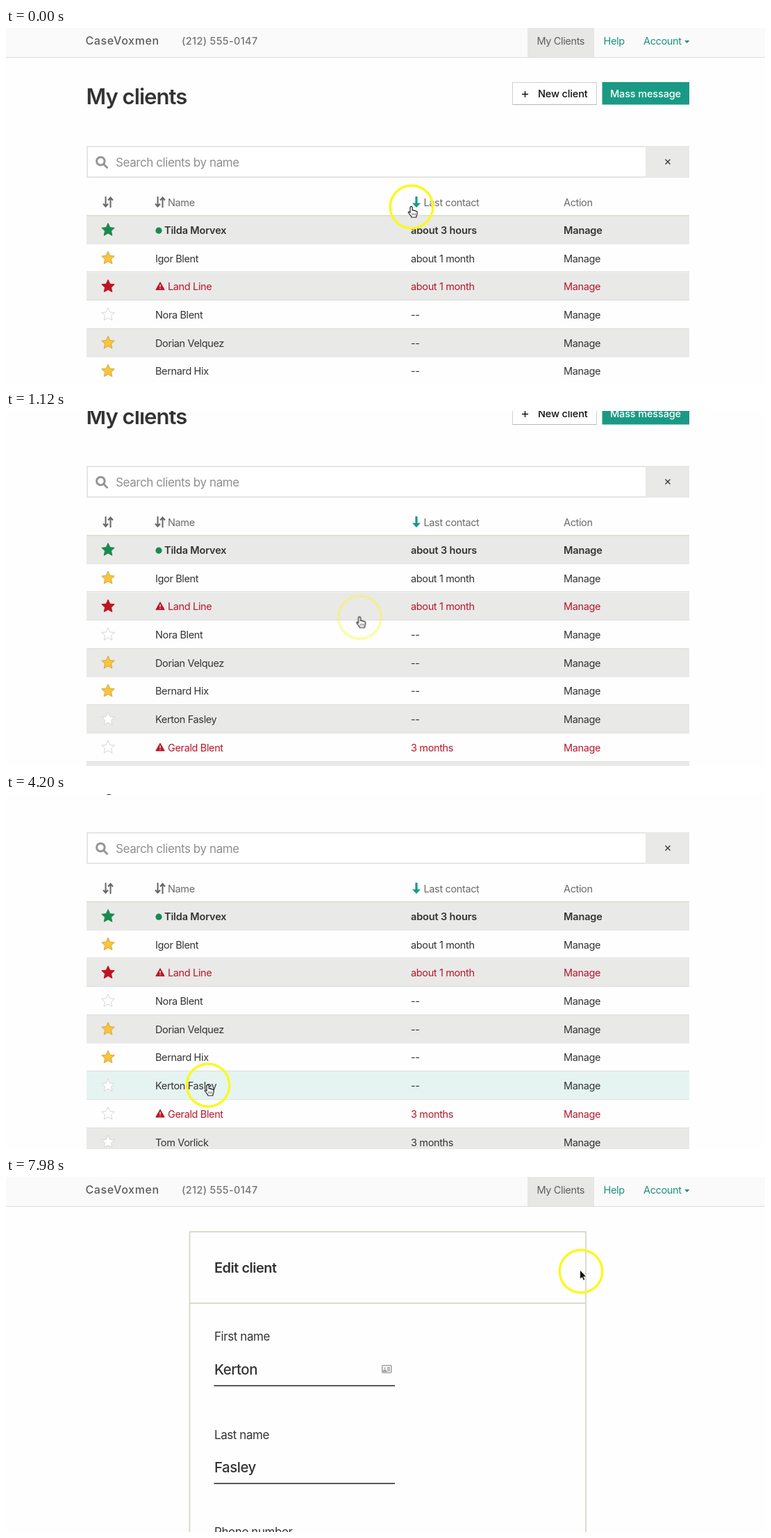
Animation, 1093 px wide and 512 px high, one loop 8000 ms. Source, as an HTML page:

```html
<!DOCTYPE html>
<html lang="en">
<head>
<meta charset="utf-8">
<title>Client list</title>
<style>
html, body { margin: 0; width: 100%; height: 100%; overflow: hidden; background: #fefefe; }
svg { display: block; }

/* y of a text is the middle of its capitals */
text { font: 400 14.5px Inter, sans-serif; letter-spacing: -.025em; fill: #333; transform: translateY(.3635em); white-space: pre; }
.med { font-weight: 500; letter-spacing: -.01em; fill: #111; }
.bold { font-weight: 600; letter-spacing: -.01em; }
.grey { fill: #6a6a6a; }
.teal { fill: #1c917b; }
.red { fill: #b5182a; }
.white { fill: #fff; }
.h1 { font-size: 31px; font-weight: 600; letter-spacing: -.03em; }
.h2 { font-size: 20.5px; font-weight: 600; }
.value { font-size: 20.5px; font-weight: 500; }
.label { font-size: 17px; }
.hint { font-size: 17px; fill: #8f8f8f; }
.brand { font-size: 16px; font-weight: 500; letter-spacing: .04em; fill: #5c5c5c; }
.tel { font-weight: 500; letter-spacing: .025em; fill: #747474; }
.mid { text-anchor: middle; fill: #6a6a6a; }
.btn { fill: #fff; stroke: #cfcfcf; }
.line { fill: none; stroke: #dcdcdc; }
.card { fill: none; stroke: #dcdacd; stroke-width: 2; }
.field { stroke: #585858; stroke-width: 2; }

/* Every step lasts 140 ms, which is 1.75% of the loop */
.anim { animation: 8s step-end -4ms infinite; }
#list { animation-name: list; }
#chat { animation-name: chat; }
#edit { animation-name: edit; }
.scroll { animation-name: scroll; }
#tab { animation-name: tab; }
#tabText { animation-name: tabText; }
#hover { animation-name: hover; }
#pressed { animation-name: pressed; }
#box { animation-name: box; }
#cursor { animation-name: move; }
#ring { animation-name: ring; }
#dot { animation-name: dot; }
#hand { animation-name: hand; }
#arrow { animation-name: arrow; }

@keyframes list { 0% { opacity: 1 } 54.25%, 100% { opacity: 0 } }
@keyframes chat { 0% { opacity: 0 } 54.25% { opacity: 1 } 92.75%, 100% { opacity: 0 } }
@keyframes edit { 0% { opacity: 0 } 92.75%, 100% { opacity: 1 } }
@keyframes tab { 0% { opacity: 1 } 54.25% { opacity: 0 } 92.75%, 100% { opacity: 1 } }
@keyframes tabText { 0% { fill: #5f5f5f } 54.25% { fill: #1c917b } 92.75%, 100% { fill: #5f5f5f } }
@keyframes hover { 0% { opacity: 0 } 40.25%, 100% { opacity: 1 } }
@keyframes pressed { 0% { opacity: 0 } 82.25%, 100% { opacity: 1 } }
@keyframes box { 0% { stroke: #1a9a84 } 82.25%, 100% { stroke: #949494 } }
@keyframes scroll {
  0% { transform: translateY(0) }
  5.25% { transform: translateY(0); animation-timing-function: steps(4) }
  12.25% { transform: translateY(-76px); animation-timing-function: steps(2) }
  15.75% { transform: translateY(-106px) }
  17.5% { transform: translateY(-115px) }
  54.25%, 100% { transform: translateY(0) }
}
@keyframes move {
  0% { transform: translate(584px, 258px); animation-timing-function: steps(4) }
  7% { transform: translate(509.5px, 297.5px) }
  14% { transform: translate(509.5px, 297.5px); animation-timing-function: steps(6) }
  24.5% { transform: translate(291px, 420px) }
  57.75% { transform: translate(317px, 398px) }
  63% { transform: translate(415.5px, 311.5px); animation-timing-function: steps(2) }
  66.5% { transform: translate(600px, 215px) }
  68.25% { transform: translate(600px, 215px); animation-timing-function: steps(6) }
  78.75% { transform: translate(933.5px, 77.5px) }
  94.5% { transform: translate(933.5px, 77.5px); animation-timing-function: steps(3) }
  99.75%, 100% { transform: translate(828px, 136px) }
}
@keyframes ring {
  0% { opacity: 1; transform: scale(1) }
  7% { opacity: 1; transform: scale(1); animation-timing-function: steps(3) }
  12.25% { opacity: .4; transform: scale(1) }
  14% { opacity: .4; transform: scale(1); animation-timing-function: steps(2) }
  17.5% { opacity: 1; transform: scale(1) }
  40.25% { opacity: 0; transform: scale(.3) }
  45.5% { opacity: .3; transform: scale(.3); animation-timing-function: steps(3) }
  50.75% { opacity: 1; transform: scale(1) }
  82.25% { opacity: 0; transform: scale(.3) }
  87.5% { opacity: .3; transform: scale(.3); animation-timing-function: steps(3) }
  92.75%, 100% { opacity: 1; transform: scale(1) }
}
@keyframes dot {
  0% { opacity: 0; stroke: #3445ae }
  40.25% { opacity: 1; stroke: #3445ae }
  45.5% { opacity: 0; stroke: #3445ae }
  82.25% { opacity: 1; stroke: #3a3a7c }
  87.5%, 100% { opacity: 0; stroke: #3a3a7c }
}
@keyframes hand { 0% { opacity: 1 } 57.75% { opacity: 0 } 78.75% { opacity: 1 } 96.25%, 100% { opacity: 0 } }
@keyframes arrow { 0% { opacity: 0 } 57.75% { opacity: 1 } 78.75% { opacity: 0 } 96.25%, 100% { opacity: 1 } }
</style>
</head>
<body>
<svg width="1093" height="512" viewBox="0 0 1093 512">
  <defs>
    <path id="star" d="M0-9.7 2.8-3.6 9.2-3 4.5 1.5 5.8 8 0 4.7-5.8 8-4.5 1.5-9.2-3-2.8-3.6z" stroke-linejoin="round"/>
    <path id="down" d="M-1.6-8h3.2V1.5H6L0 8-6 1.5h4.4z"/>
    <g id="sort" fill="none" stroke="#666" stroke-width="2">
      <path d="M-3.5-8V6M-7 2.5l3.5 4 3.5-4M3.5 8V-6M0-2.5l3.5-4 3.5 4"/>
    </g>
    <g id="warn">
      <path d="M0-5.5 6.2 5.5H-6.2z" fill="#b5182a" stroke="#b5182a" stroke-linejoin="round"/>
      <path d="M0-2V1.6M0 2.8V4.2" stroke="#f3e3e4" stroke-width="1.4"/>
    </g>
  </defs>

  <g id="list" class="anim">
    <g class="anim scroll">
      <text class="h1" x="115.5" y="99">My clients</text>
      <rect class="btn" x="729.5" y="78.5" width="121" height="32"/>
      <path d="M730 110.5h120" stroke="#b9b9b9"/>
      <path d="M743 95.5h9M747.5 91v9" stroke="#111" stroke-width="1.4"/>
      <text class="med" x="766" y="94.5">New client</text>
      <rect x="858.5" y="78" width="125.5" height="32.5" fill="#1a9a84"/>
      <text class="med white" x="870" y="94.5">Mass message</text>

      <rect x="117" y="171" width="866" height="44" fill="#fff" stroke="#e6e6e4" stroke-width="2"/>
      <rect x="921" y="170" width="63" height="46" fill="#e9e9e8"/>
      <g fill="none" stroke="#969696" stroke-width="3">
        <circle cx="136.3" cy="192" r="5.8"/>
        <path d="M140.5 196.2l5 5" stroke-linecap="round"/>
      </g>
      <text class="hint" x="158" y="194">Search clients by name</text>
      <path d="M949.5 189.5l7 7m0-7l-7 7" stroke="#333" stroke-width="1.4"/>

      <use href="#sort" x="147" y="251"/>
      <use href="#sort" x="222" y="251"/>
      <text class="grey" x="233" y="252">Name</text>
      <use href="#down" x="591" y="251" fill="#1a9a84"/>
      <text class="grey" x="601.5" y="252">Last contact</text>
      <text class="grey" x="803" y="252">Action</text>
      <g id="rows"></g>
      <path d="M116 270.5h868" stroke="#dbdacb" stroke-width="1.6"/>
    </g>
  </g>

  <g id="chat" class="anim">
    <path class="line" d="M0 119.5h1093M0 494.5h1093"/>
    <rect class="btn" x="115.5" y="60.5" width="84" height="33"/>
    <rect class="btn" x="859.5" y="60.5" width="120" height="33"/>
    <path d="M115 93.5h85M859 93.5h121" stroke="#b9b9b9"/>
    <path d="M139 78.5h-9.5m4.2-4.4-4.4 4.4 4.4 4.4" fill="none" stroke="#111" stroke-width="1.5"/>
    <text class="med" x="148" y="78">Home</text>
    <text class="h2" x="213.5" y="72.5">Kerton Fasley</text>
    <text x="214" y="100" style="letter-spacing:-.005em">(800) 555-0163</text>
    <rect id="pressed" class="anim" x="860" y="61" width="119" height="32" fill="#dbdad1" stroke="#74c7b7" stroke-width="2"/>
    <text class="med" x="871" y="78">Manage client</text>

    <path d="M523 218l10 4q10-1 17 2 8-4 16-2l12-4v26l-7 3q-3 7-10 8-4 7-10 8-5 1-8-3-7 0-9-5-5 0-6-5l-5-6z" fill="#fbc751"/>
    <path d="M578 240v4l-7 3q-3 7-10 8-4 7-10 8l-3-1q8-3 10-9 8-2 11-9z" fill="#d9a136"/>
    <path d="M567 222q-13 0-18 5l-9 8q4 5 10 0l6-3q7 4 15 12M528 250q1-5 6-6 2 4-1 10M534 255q1-6 6-7 4 4 3 12M543 260q0-6 5-7 4 4 2 9" fill="none" stroke="#cb922b" stroke-width="1.3" stroke-linecap="round"/>

    <text class="mid" x="550" y="289">You haven’t sent Kerton any messages</text>
    <text class="mid" x="550" y="311">yet. Start by introducing yourself.</text>
    <rect id="box" class="anim" x="116.5" y="506" width="570.5" height="60" fill="#fff" stroke-width="2"/>
    <rect x="708" y="505" width="86.5" height="33" fill="#1a9a84"/>
    <rect class="btn" x="799.5" y="505.5" width="120" height="33"/>
  </g>

  <g id="edit" class="anim">
    <path class="card" d="M264.5 520V79h570.5v441M264.5 182h570.5"/>
    <text class="h2" x="300" y="131" style="font-size:20px">Edit client</text>
    <text class="label" x="300" y="230">First name</text>
    <text class="value" x="300" y="277.5">Kerton</text>
    <g fill="none" stroke="#a2a2a2" stroke-width="1.6">
      <rect x="541.8" y="271.8" width="13" height="10.4" rx="1.2"/>
      <path d="M549 274.7h4M549 277h4M549 279.3h4"/>
      <path d="M543.5 280q2-3 4 0zM545.5 274.4v2.4" stroke-width="2"/>
    </g>
    <path class="field" d="M299.5 301H560M299.5 442H560"/>
    <text class="label" x="300" y="371.5">Last name</text>
    <text class="value" x="300" y="418.5">Fasley</text>
    <text class="label" x="300" y="512">Phone number</text>
  </g>

  <g class="anim scroll">
    <rect width="1093" height="42" fill="#fafafa"/>
    <path d="M0 42.5h1093" stroke="#dcdcd6"/>
    <rect id="tab" class="anim" x="751" width="96" height="42" fill="#e7e7e6"/>
    <text class="brand" x="114.5" y="18.5">CaseVoxmen</text>
    <text class="tel" x="253" y="18.5">(212) 555-0147</text>
    <text id="tabText" class="anim" x="764.5" y="18.5">My Clients</text>
    <text class="teal" x="860.5" y="18.5">Help</text>
    <text class="teal" x="918" y="18.5">Account</text>
    <path class="teal" d="M977 18h7.4l-3.7 4z"/>
  </g>

  <g id="cursor" class="anim">
    <circle id="ring" class="anim" r="30.8" fill="none" stroke="#fbf81f" stroke-width="3.4"/>
    <circle id="dot" class="anim" r="9" fill="none" stroke-width="3"/>
    <g id="hand" class="anim">
      <path d="M-2 1a1.6 1.6 0 0 1 3.2 0v4l1-.3 1.2.3.8.6 1.2-.2.8.8 1.3.2.6 1v3l-1.2 3V15h-7l-.4-1.4-2.8-3.6-1.5-2 .6-1 1.2.2 1 1.2z" fill="#fff" stroke="#222" stroke-width="1.2" stroke-linejoin="round"/>
      <path d="M1 9.2v3M3.2 9.2v3M5.4 9.2v3" stroke="#333" stroke-width=".8"/>
    </g>
    <path id="arrow" class="anim" d="M-1.5-2V11.5l3-2.8 2 4.6 2.3-1-2-4.4h4.2z" fill="#111" stroke="#fff" stroke-width=".9"/>
  </g>
</svg>
<script>
const stars = {
  green: ['#188a4d', '#188a4d'],
  gold: ['#f7c43a', '#d8a545'],
  red: ['#bd1522', '#bd1522'],
  none: ['#fff', '#d5d5d5']
};
const clients = [
  ['green', 'Tilda Morvex', 'about 3 hours', 'bold'],
  ['gold', 'Igor Blent', 'about 1 month'],
  ['red', 'Land Line', 'about 1 month', 'red'],
  ['none', 'Nora Blent', '--'],
  ['gold', 'Dorian Velquez', '--'],
  ['gold', 'Bernard Hix', '--'],
  ['none', 'Kerton Fasley', '--'],
  ['none', 'Gerald Blent', '3 months', 'red'],
  ['none', 'Tom Vorlick', '3 months']
];
const rowHeight = 40.7, clicked = 6;
const nameX = { bold: 228, red: 233 };
const badge = {
  bold: y => `<circle cx="220" cy="${y + .5}" r="4.6" fill="#188a4d"/>`,
  red: y => `<use href="#warn" x="222" y="${y - 1}"/>`
};

function row([star, name, contact, kind = ''], i) {
  const top = 271 + i * rowHeight, y = top + 20.7;
  const band = attrs => `<rect x="116" y="${top}" width="868" height="${rowHeight}" ${attrs}/>`;
  const cell = (x, text) => `<text class="${kind}" x="${x}" y="${y}">${text}</text>`;
  const [fill, stroke] = stars[star];
  const edge = Math.round(top + rowHeight) - .5;
  return band(`fill="${i % 2 ? '#fefefe' : '#e9e9e8'}"`)
    + (i === clicked ? band('id="hover" class="anim" fill="#e6f4f1"') : '')
    + `<path class="line" d="M116 ${edge}h868"/>`
    + `<use href="#star" x="147" y="${y - .4}" fill="${fill}" stroke="${stroke}"/>`
    + (badge[kind] ? badge[kind](y) : '')
    + cell(nameX[kind] || 215, name) + cell(583, contact) + cell(803, 'Manage');
}

document.getElementById('rows').innerHTML = clients.map(row).join('');
</script>
</body>
</html>
```
